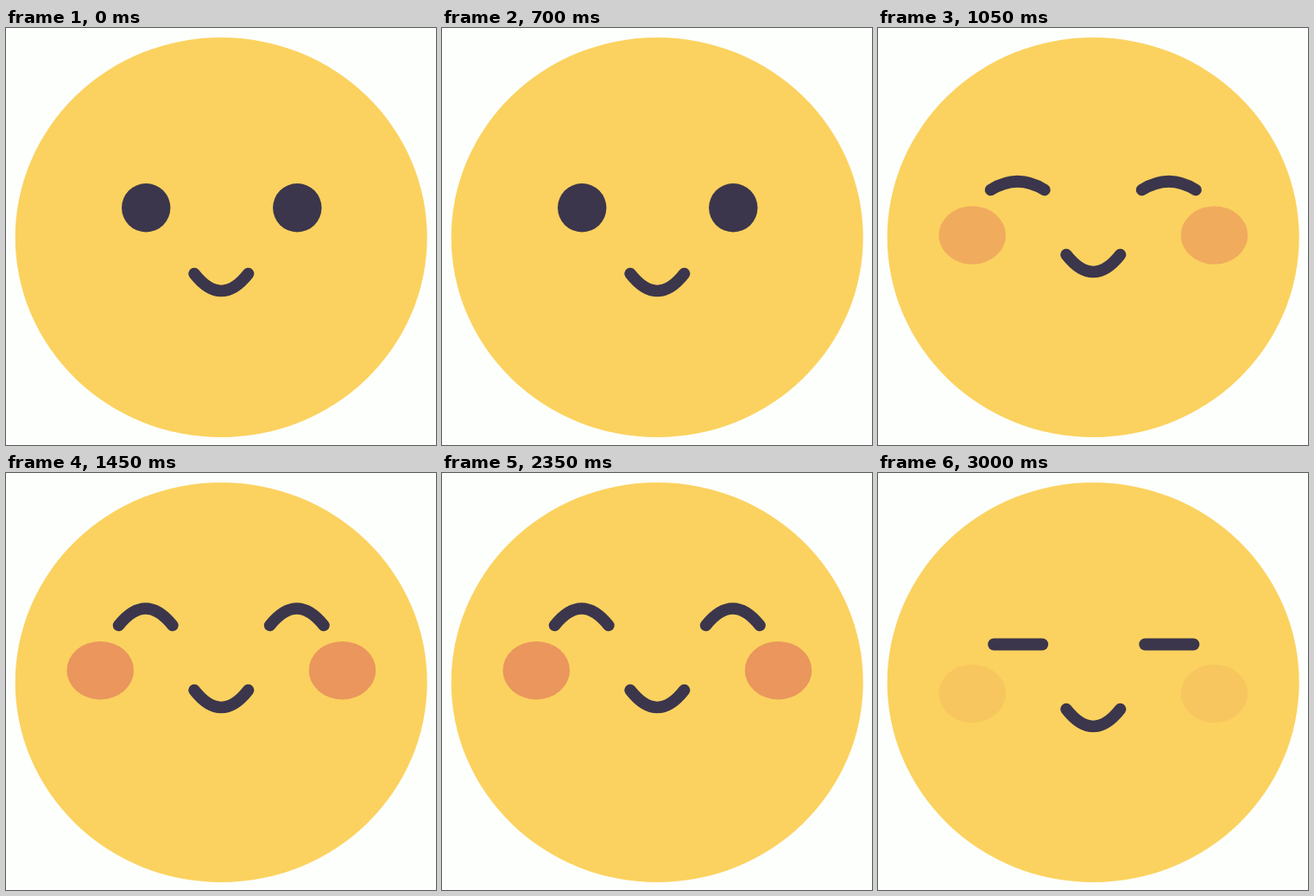
An HTML page for the animation above (3.05 s loop, 498 px wide and 483 px high).

```html
<!DOCTYPE html>
<html lang="en">
<head>
<meta charset="utf-8">
<title>Blushing smiley</title>
<style>
  html, body { margin: 0; width: 100%; height: 100%; overflow: hidden; background: #fdfffc; }
  svg { display: block; width: 498px; height: 483px; }
  .line { fill: none; stroke: #3b364c; stroke-width: 13.6; stroke-linecap: round; }
  .dot { fill: #3b364c; }
  .cheek { fill: #ea965d; }
</style>
</head>
<body>
<svg viewBox="0 0 498 483">
  <ellipse cx="249.2" cy="242.5" rx="238.5" ry="231.5" fill="#fbd25f"/>
  <ellipse class="cheek" cx="109.2" rx="38.8" ry="33.7"/>
  <ellipse class="cheek" cx="389.5" rx="38.8" ry="33.7"/>
  <rect class="dot"/>
  <rect class="dot"/>
  <path class="line eye"/>
  <path class="line eye"/>
  <path class="line" id="mouth"/>
</svg>
<script>
const LOOP = 3050, TICK = 50, RISE = 950, STAGES = 3, LIFT = 11;
const EYE_X = [162.2, 337.3];
const all = selector => [...document.querySelectorAll(selector)];
const cheeks = all('.cheek'), dots = all('.dot'), eyes = all('.eye');
const mouth = document.getElementById('mouth');

const clamp = (v, lo, hi) => Math.min(hi, Math.max(lo, v));
const mix = (a, b, k) => a + (b - a) * k;

// Linear interpolation between one value per stage
function keyed(values, s) {
  const i = Math.min(Math.floor(s), values.length - 2);
  return mix(values[i], values[i + 1], s - i);
}

function set(el, attrs) {
  for (const name in attrs) el.setAttribute(name, attrs[name]);
}

const arc = (x, y, half, depth) =>
  `M${x - half} ${y}Q${x} ${y + 2 * depth} ${x + half} ${y}`;

function draw(ms) {
  const t = Math.floor((ms % LOOP) / TICK) * TICK;
  const s = clamp(Math.min(t - RISE, LOOP - t) / TICK, 0, STAGES);
  const lift = LIFT * s;

  mouth.setAttribute('d', arc(249.3, 284.5 - lift, 31.3, 20));

  for (const cheek of cheeks) {
    set(cheek, {
      cy: keyed([262, 255.5, 240, 228.7], s),
      opacity: keyed([0, 0.2, 0.63, 1], s)
    });
  }

  // Round eyes flatten into bars, then bend into arcs
  const bent = s > 1;
  const w = mix(56.4, 70, Math.min(s, 1)), h = mix(56.4, 14, Math.min(s, 1));
  EYE_X.forEach((x, i) => {
    const cy = (s < 1 ? mix(208.3, 198.5, s) : 209.5 - lift);
    set(dots[i], {
      x: x - w / 2, y: cy - h / 2, width: w, height: h, rx: h / 2,
      visibility: bent ? 'hidden' : 'visible'
    });
    set(eyes[i], {
      d: arc(x - 0.5, 209.5 - lift, 31.2, -9.75 * (s - 1)),
      visibility: bent ? 'visible' : 'hidden'
    });
  });
}

const start = performance.now();
function frame() {
  draw(performance.now() - start);
  requestAnimationFrame(frame);
}
frame();
</script>
</body>
</html>
```
